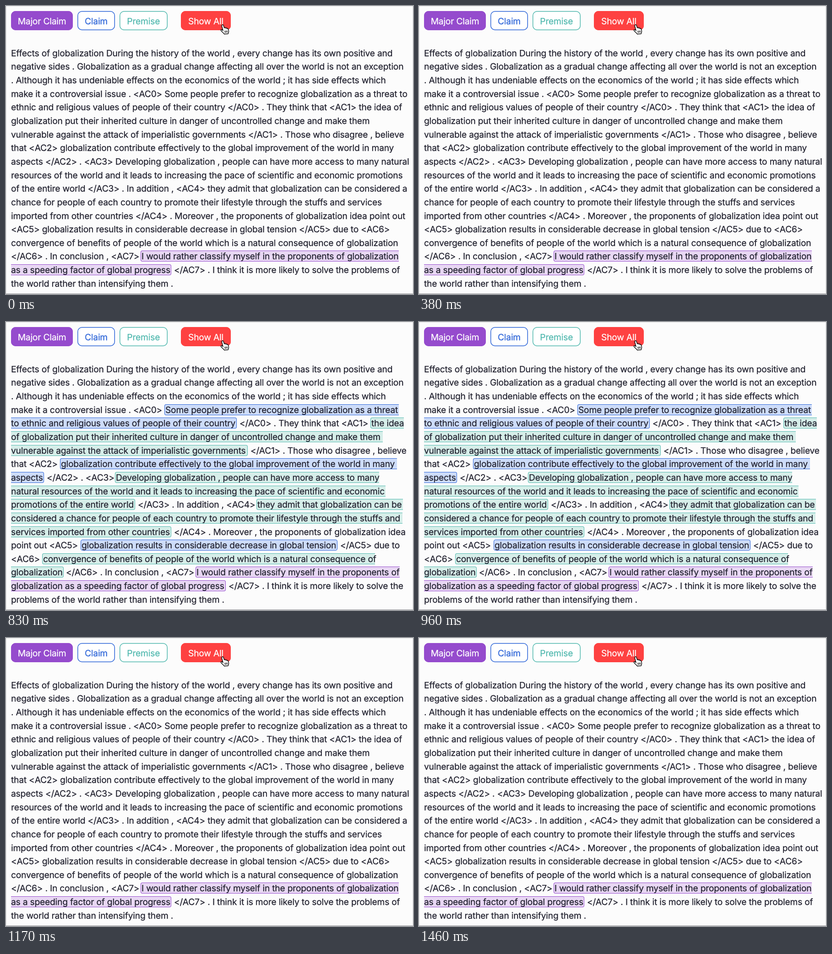
An HTML page for the animation above (1500 ms loop, 889 by 630 pixels).

```html
<!DOCTYPE html>
<html lang="en">
<meta charset="utf-8">
<title>Argument highlighter</title>
<style>
  html, body { margin: 0; width: 100%; height: 100%; overflow: hidden; }
  body {
    position: relative; box-sizing: border-box; background: #fcfcfc; color: #20202e;
    border: 1px solid #e6e6e6; border-bottom-color: #8e8e92;
    font: 19.2px Inter, sans-serif; letter-spacing: -.19px;
    text-rendering: geometricPrecision; -webkit-text-stroke: .25px;
  }
  #stage { position: absolute; left: -1px; top: -1px; }
  .run, .button { position: absolute; box-sizing: border-box; white-space: pre; }
  .run { height: 24px; line-height: 22px; padding-top: 1px; }
  .mark { padding: 0; border: 1px solid var(--edge); border-width: 1px 0; background: var(--fill); }
  .start { border-left-width: 1px; border-radius: 4px 0 0 4px; padding-left: 1px; }
  .end { border-right-width: 1px; border-radius: 0 4px 4px 0; }
  .start.end { border-radius: 4px; }
  .major { --edge: #954bcd; --fill: #e8d7f3; }
  .claim { --edge: #2d65d8; --fill: #cddcf9; }
  .premise { --edge: #50b8ae; --fill: #d6eee9; }
  .button {
    top: 11px; height: 42px; line-height: 42px; padding-top: 1px; border-radius: 10px;
    text-align: center; background: #fff; color: var(--edge); box-shadow: inset 0 0 0 1.5px var(--edge);
  }
  .button.solid { background: var(--edge); color: #fff; }
  .all { --edge: #fe4141; }
  svg { position: absolute; left: 464.5px; top: 37.5px; }
</style>
<body>
<div id="stage">
  <div class="button major solid" style="left:11px;width:135px">Major Claim</div>
  <div class="button claim" style="left:156px;width:82px">Claim</div>
  <div class="button premise" style="left:248px;width:104.5px">Premise</div>
  <div class="button all solid" style="left:382px;width:109px">Show All</div>
  <div id="majorView"></div>
  <div id="allView"></div>
  <svg width="25.7" height="27.8" viewBox="0 0 24 26">
    <path d="M6.4 3.2C7.6 2.2 9 2.9 9.4 4.2L11 9.2C11.8 8.3 13.3 8.6 13.7 9.7C14.7 8.9 16 9.4 16.4 10.5C17.6 9.9 18.8 10.6 19.1 12L20 15.5C20.3 17.5 19.2 18.8 18.9 21.2L11 22C10.2 20 7.3 18.3 4.9 15.6C3 13.4 4.8 12.1 6.5 13.2L8.4 14.7L6 5.8C5.7 4.6 5.7 3.8 6.4 3.2Z" fill="#fff" stroke="#111" stroke-width="1.4" stroke-linejoin="round"/>
    <path d="M11.9 15.2l1 4.2M14.3 14.9l.8 4.2M16.7 14.6l.6 4" fill="none" stroke="#111" stroke-width="1.1"/>
  </svg>
</div>
<script>
  const LEFT = 11, TOP = 90.7, PITCH = 29.65, LOOP = 1500;

  // A line is plain text or a list of runs: [x, text] or [x, text, kind, right edge]
  const intro = [
    'Effects of globalization During the history of the world , every change has its own positive and',
    'negative sides . Globalization as a gradual change affecting all over the world is not an exception',
    '. Although it has undeniable effects on the economics of the world ; it has side effects which',
  ];
  const majorLines = [
    ...intro,
    'make it a controversial issue . <AC0> Some people prefer to recognize globalization as a threat to',
    'ethnic and religious values of people of their country </AC0> . They think that <AC1> the idea of',
    'globalization put their inherited culture in danger of uncontrolled change and make them',
    'vulnerable against the attack of imperialistic governments </AC1> . Those who disagree , believe',
    'that <AC2> globalization contribute effectively to the global improvement of the world in many',
    'aspects </AC2> . <AC3> Developing globalization , people can have more access to many natural',
    'resources of the world and it leads to increasing the pace of scientific and economic promotions',
    'of the entire world </AC3> . In addition , <AC4> they admit that globalization can be considered a',
    'chance for people of each country to promote their lifestyle through the stuffs and services',
    'imported from other countries </AC4> . Moreover , the proponents of globalization idea point out',
    '<AC5> globalization results in considerable decrease in global tension </AC5> due to <AC6>',
    'convergence of benefits of people of the world which is a natural consequence of globalization',
    [[LEFT, '</AC6> . In conclusion , <AC7>'],
     [294, 'I would rather classify myself in the proponents of globalization', 'major', 858]],
    [[LEFT, 'as a speeding factor of global progress', 'major', 361],
     [367, '</AC7> . I think it is more likely to solve the problems of']],
    'the world rather than intensifying them .',
  ];
  const allLines = [
    ...intro,
    [[LEFT, 'make it a controversial issue . <AC0>'],
     [346, 'Some people prefer to recognize globalization as a threat', 'claim', 858]],
    [[LEFT, 'to ethnic and religious values of people of their country', 'claim', 504],
     [510, '</AC0> . They think that <AC1>'],
     [796, 'the idea', 'premise', 869]],
    [[LEFT, 'of globalization put their inherited culture in danger of uncontrolled change and make them', 'premise', 823]],
    [[LEFT, 'vulnerable against the attack of imperialistic governments', 'premise', 528],
     [534, '</AC1> . Those who disagree , believe']],
    [[LEFT, 'that <AC2>'],
     [118, 'globalization contribute effectively to the global improvement of the world in many', 'claim', 854]],
    [[LEFT, 'aspects', 'claim', 83],
     [89, '</AC2> . <AC3>'],
     [238, 'Developing globalization , people can have more access to many', 'premise', 815]],
    [[LEFT, 'natural resources of the world and it leads to increasing the pace of scientific and economic', 'premise', 829]],
    [[LEFT, 'promotions of the entire world', 'premise', 282],
     [288, '</AC3> . In addition , <AC4>'],
     [547, 'they admit that globalization can be', 'premise', 867]],
    [[LEFT, 'considered a chance for people of each country to promote their lifestyle through the stuffs and', 'premise', 866]],
    [[LEFT, 'services imported from other countries', 'premise', 361],
     [367, '</AC4> . Moreover , the proponents of globalization idea']],
    [[LEFT, 'point out <AC5>'],
     [163, 'globalization results in considerable decrease in global tension', 'claim', 724],
     [730, '</AC5> due to']],
    [[LEFT, '<AC6>'],
     [79, 'convergence of benefits of people of the world which is a natural consequence of', 'premise', 806]],
    [[LEFT, 'globalization', 'premise', 126],
     [131, '</AC6> . In conclusion , <AC7>'],
     [414, 'I would rather classify myself in the proponents of', 'major', 860]],
    [[LEFT, 'globalization as a speeding factor of global progress', 'major', 480],
     [486, '</AC7> . I think it is more likely to solve the']],
    'problems of the world rather than intensifying them .',
  ];

  function build(view, lines) {
    lines.forEach((line, row) => {
      const runs = typeof line === 'string' ? [[LEFT, line]] : line;
      runs.forEach(([x, text, kind, right], i) => {
        const run = document.createElement('div');
        run.className = 'run';
        run.textContent = text;
        run.style.left = x + 'px';
        run.style.top = TOP + row * PITCH + 'px';
        if (kind) {
          run.classList.add('mark', kind);
          run.classList.toggle('start', x > LEFT);
          run.classList.toggle('end', i < runs.length - 1);
          run.style.width = right - x + 'px';
        }
        view.append(run);
      });
    });
  }

  const majorView = document.getElementById('majorView');
  const allView = document.getElementById('allView');
  build(majorView, majorLines);
  build(allView, allLines);

  function draw() {
    const t = performance.now() % LOOP;
    const showAll = t >= 500 && t < 1170;
    majorView.hidden = showAll;
    allView.hidden = !showAll;
    requestAnimationFrame(draw);
  }
  draw();
</script>
</body>
</html>
```
